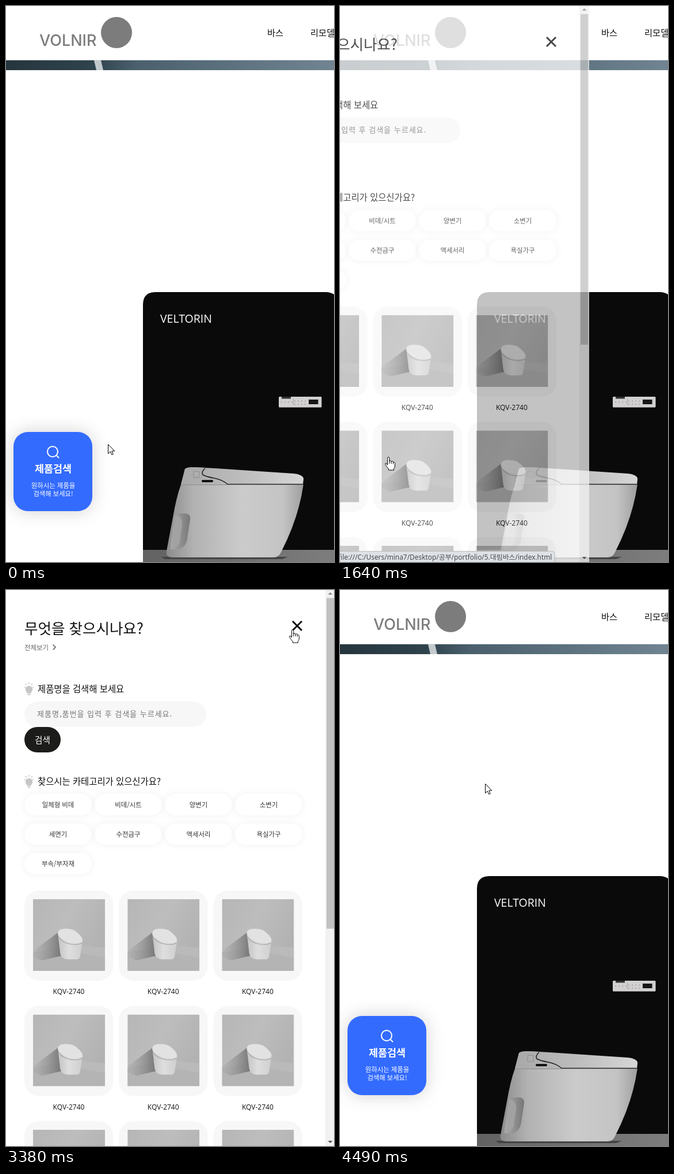
Animation, 570 px wide and 962 px high, one loop 5.02 s. Source, as an HTML page:

```html
<!DOCTYPE html>
<html lang="ko">
<head>
<meta charset="utf-8">
<title>제품검색</title>
<style>
html, body { margin: 0; width: 100%; height: 100%; overflow: hidden; background: #fff; }
svg { display: block; width: 570px; height: 962px; }
text { font-family: "Noto Sans CJK KR", "Noto Sans CJK", sans-serif; fill: #111; white-space: pre; }
.latin { font-family: "Open Sans", "Noto Sans", sans-serif; }
.mid { font-weight: 500; }
.anim { animation: 5020ms linear infinite both; }

#panel { animation-name: panel; }
@keyframes panel {
  0%, 27.31% { transform: translateX(-572px); opacity: 0; animation-timing-function: ease; }
  39.06%, 68.88% { transform: none; opacity: 1; animation-timing-function: ease; }
  80.64%, 100% { transform: translateX(-572px); opacity: 0; }
}
#search { animation-name: search; }
@keyframes search {
  0%, 17.93% { opacity: 1; animation-timing-function: ease-in-out; }
  26.7%, 81.1% { opacity: 0; animation-timing-function: ease-in-out; }
  89.2%, 100% { opacity: 1; }
}
#status { animation-name: status; }
@keyframes status {
  0%, 13.1% { opacity: 0; }
  15.5%, 27.9% { opacity: 1; }
  30.08% { opacity: .25; }
  32%, 49.8% { opacity: 1; }
  53.4%, 100% { opacity: 0; }
}
#drop { animation-name: drop; transform-origin: 0 94px; }
@keyframes drop {
  0%, 69.9% { transform: scaleY(0); }
  70.7% { transform: scaleY(.5); }
  72.3% { transform: scaleY(1); }
  75%, 100% { transform: scaleY(0); }
}
#bath { animation-name: bath; }
@keyframes bath {
  0%, 68.7% { fill: #111; }
  69.7%, 71.7% { fill: #337ab7; }
  72.5%, 100% { fill: #111; }
}
#cursor { animation-name: travel; }
@keyframes travel {
  0%, 5.38% { transform: translate(177px, 758px); animation-timing-function: ease-in-out; }
  10.36%, 45.22% { transform: translate(84px, 780px); }
  52.19% { transform: translate(480px, 87px); }
  55.18% { transform: translate(494px, 70px); }
  57.97%, 62.55% { transform: translate(495px, 70px); }
  63.35%, 67.33% { transform: translate(498px, 68px); }
  70.72% { transform: translate(471px, 97px); }
  77.7% { transform: translate(294px, 296px); }
  81.1%, 100% { transform: translate(252px, 335px); }
}
#arrow, #hand { animation-timing-function: step-end; }
#arrow { animation-name: arrow; }
#hand { animation-name: hand; }
@keyframes arrow { 0% { opacity: 1; } 7% { opacity: 0; } 47.8% { opacity: 1; } 62.7% { opacity: 0; } 68.5%, 100% { opacity: 1; } }
@keyframes hand { 0% { opacity: 0; } 7% { opacity: 1; } 47.8% { opacity: 0; } 62.7% { opacity: 1; } 68.5%, 100% { opacity: 0; } }

.pill { fill: #fff; filter: drop-shadow(0 0 6px rgba(0, 0, 0, .06)); }
.blue { fill: #336bff; filter: drop-shadow(0 0 15px rgba(0, 0, 0, .18)); }
</style>
</head>
<body>
<svg viewBox="0 0 570 962">
  <defs>
    <linearGradient id="band">
      <stop stop-color="#25353d"/><stop offset=".27" stop-color="#30444e"/>
      <stop offset=".4" stop-color="#4b606d"/><stop offset="1" stop-color="#708491"/>
    </linearGradient>
    <linearGradient id="bowl">
      <stop stop-color="#8b8b8b"/><stop offset=".2" stop-color="#b2b2b2"/>
      <stop offset=".55" stop-color="#cbcbcb"/><stop offset=".85" stop-color="#c4c4c4"/><stop offset="1" stop-color="#9e9e9e"/>
    </linearGradient>
    <linearGradient id="lid">
      <stop stop-color="#a8a8a8"/><stop offset=".5" stop-color="#bdbdbd"/><stop offset="1" stop-color="#d6d6d6"/>
    </linearGradient>
    <linearGradient id="hollow">
      <stop stop-color="#aaa"/><stop offset="1" stop-color="#777"/>
    </linearGradient>
    <linearGradient id="ground">
      <stop stop-color="#626262"/><stop offset="1" stop-color="#7d7d7d"/>
    </linearGradient>
    <linearGradient id="wall" x2="1" y2=".5">
      <stop stop-color="#b6b6b6"/><stop offset=".5" stop-color="#bdbdbd"/><stop offset="1" stop-color="#b2b2b2"/>
    </linearGradient>
    <linearGradient id="shade">
      <stop stop-color="#999" stop-opacity=".15"/><stop offset="1" stop-color="#777"/>
    </linearGradient>
    <linearGradient id="pot">
      <stop stop-color="#c4c4c4"/><stop offset=".45" stop-color="#dedede"/><stop offset="1" stop-color="#cfcfcf"/>
    </linearGradient>
    <symbol id="photo" width="125" height="124" viewBox="0 0 125 124">
      <path fill="url(#wall)" d="M0 0H125V124H0Z"/>
      <path fill="#b4b4b4" d="M0 92L45 84L125 99V124H0Z"/>
      <path fill="#bababa" d="M82 80L125 84V101L80 93Z"/>
      <path fill="url(#shade)" d="M0 90L44 57L49 98L15 106L0 99Z"/>
      <path fill="url(#pot)" d="M43 58L47 92Q48 103 60 104H76Q81 104 82 98L86 72Z"/>
      <path fill="#b1b1b1" d="M43 59Q45 68 56 74Q72 81 85 75V77Q71 82 56 76Q44 71 43 59Z"/>
      <path fill="#e2e2e2" d="M43 58Q44 51 56 51Q66 51 72 54Q87 65 86 72Q84 77 72 76Q58 75 50 69Q43 64 43 58Z"/>
    </symbol>
    <g id="bulb">
      <circle cx="8" cy="12" r="6.2" fill="#c6c6c6"/>
      <path fill="#c6c6c6" d="M4.5 16h7v3h-7zM5.5 20h5v2h-5z"/>
      <path stroke="#c6c6c6" stroke-width="1.5" d="M8 0v3M2 2l2 2.5M14 2l-2 2.5M0 8l2 .6M16 8l-2 .6"/>
    </g>
  </defs>

  <rect width="570" height="962" fill="#fff"/>
  <g id="page">
    <rect y="94" width="570" height="17" fill="url(#band)"/>
    <path fill="#c3c9cd" d="M153 94H165L169 111H157Z"/>
    <rect id="drop" class="anim" y="94" width="570" height="6" fill="#fff"/>
    <path stroke="#dfe2e4" d="M0 93.5H570"/>
    <text x="58" y="69" textLength="" style="font:500 27px Inter,sans-serif;fill:#7c7c7c">VOLNIR</text>
    <circle cx="192" cy="46" r="27" fill="#7c7c7c"/>
    <text id="bath" class="mid anim" x="454" y="52" font-size="15.3">바스</text>
    <text class="mid" x="529" y="52" font-size="15.3">리모델링</text>

    <path fill="#0a0a0a" d="M238 962V517Q238 495 260 495H555Q577 495 577 517V962Z"/>
    <path fill="url(#ground)" d="M238 941H570V962H238Z"/>
    <text class="latin" x="268" y="548" font-size="19.5" style="fill:#fff">VELTORIN</text>
    <rect x="474" y="676" width="74.5" height="18.5" rx="1.5" fill="#d2d0d1"/>
    <path fill="#333" d="M479 676H495V679.5H479Z"/>
    <path fill="#161616" d="M526 681H542.5V689H526Z"/>
    <path stroke="#aaa" stroke-width="2" stroke-dasharray="2 4" d="M478 685.5H498M501 683.5H523M501 689H523"/>
    <path stroke="#999" stroke-width=".7" d="M499.500 679V691"/>

    <path fill="#444" d="M270 953H490L480 957H276Z"/>
    <path fill="url(#bowl)" d="M311 801Q314 798 325 798L347 799L385 827H517Q509 885 478 945Q474 954 465 954H289Q277 954 279 943L290 885Q296 850 304 828Z"/>
    <path fill="url(#lid)" d="M311 801Q314 798 328 798L365 800L500 809Q518 811 517 819L516 828H304Z"/>
    <path fill="none" stroke="#222" stroke-width="1.6" d="M346 800Q339 806 342 811Q346 814 362 817Q377 820 385 827.500H517"/>
    <path fill="none" stroke="#8c8c8c" d="M304 828.500H385M326 805H336V816H326Z"/>
    <rect x="340" y="820" width="20" height="4" rx="2" fill="#111"/>
    <path fill="url(#hollow)" d="M293 881Q295 878 302 878H312Q321 879 320 888L315 921Q313 936 300 940H287Q285 940 286 934Z"/>
    <path fill="#a2a2a2" d="M293 886Q294 881 300 883Q307 887 306 896L302 926Q300 937 288 938Z"/>
  </g>

  <g id="search" class="anim">
    <rect class="blue" x="13" y="737" width="137" height="137" rx="25"/>
    <path fill="none" stroke="#fff" stroke-width="2" stroke-linecap="round" d="M72 771a9 9 0 1 0 18 0a9 9 0 1 0 -18 0M87.500 777.500L91.500 781.500"/>
    <g text-anchor="middle" style="--ink:#fff">
      <text x="82" y="806.500" font-size="17.400" font-weight="700" style="fill:#fff">제품검색</text>
      <text class="mid" x="82" y="833.500" font-size="11.400" style="fill:#fff">원하시는 제품을</text>
      <text class="mid" x="82" y="847.500" font-size="11.300" style="fill:#fff">검색해 보세요!</text>
    </g>
  </g>

  <g id="panel" class="anim">
    <rect width="572" height="962" fill="#fff"/>
    <text x="32" y="75.500" font-size="25.500">무엇을 찾으시나요?</text>
    <text x="32" y="103.500" font-size="11.400" style="fill:#666">전체보기</text>
    <path fill="none" stroke="#666" stroke-width="1.600" d="M81.500 94.500L86 99L81.500 103.500"/>
    <path stroke="#0a0a0a" stroke-width="3" d="M498 54L514 70M514 54L498 70"/>
    <use href="#bulb" x="32" y="160"/>
    <text class="mid" x="55" y="176.500" font-size="15.400">제품명을 검색해 보세요</text>
    <rect x="32" y="193" width="316" height="44" rx="22" fill="#f7f7f7"/>
    <text x="54" y="219" font-size="13" letter-spacing="1" style="fill:#757575">제품명,품번을 입력 후 검색을 누르세요.</text>
    <rect x="32" y="237" width="63" height="44" rx="22" fill="#1c1c1b"/>
    <text class="mid" x="63.500" y="264.500" font-size="14.600" text-anchor="middle" style="fill:#fff">검색</text>
    <use href="#bulb" x="32" y="320"/>
    <text class="mid" x="55" y="336.500" font-size="15.400">찾으시는 카테고리가 있으신가요?</text>
    <g id="pills" text-anchor="middle"></g>
    <g id="cards" text-anchor="middle"></g>
    <rect x="555" width="17" height="962" fill="#f1f1f1"/>
    <rect x="557" y="14" width="13" height="572" fill="#c1c1c1"/>
    <path fill="#8a8a8a" d="M559.500 8L563.500 4L567.500 8Z"/>
    <path fill="#505050" d="M559.500 953L563.500 957L567.500 953Z"/>
  </g>

  <g id="status" class="anim">
    <path fill="#dee1e6" stroke="#b9bcc1" d="M-1 943.500H369Q372.500 943.500 372.500 947V963H-1Z"/>
    <text x="-3" y="957.500" font-size="11.900" style="font-family:'Noto Sans','Noto Sans CJK KR',sans-serif;fill:#484b4f">file:///C:/Users/mina7/Desktop/공부/portfolio/5.대림바스/index.html</text>
  </g>

  <g id="cursor" class="anim" fill="#fff" stroke="#000" stroke-linejoin="round">
    <path id="arrow" class="anim" d="M.5 .5V16.500L4.300 13L6.800 18.500L9.200 17.400L6.800 12H11.800Z"/>
    <g id="hand" class="anim">
      <path d="M-1.500 14V2.500Q-1.500 .5 0 .5Q1.800 .5 1.800 2.500V8Q2 6.700 3.400 6.700Q5 6.700 5.200 8.500Q5.600 7.500 6.800 7.600Q8.300 7.800 8.500 9.500Q9.200 8.800 10.200 9.200Q11.500 9.700 11.500 11.500V16Q11.500 18 9.500 20.500V23H.5V21Q-2.500 18 -5 13.500Q-6 11.500 -4.500 11Q-3.300 10.800 -1.500 14Z"/>
      <path fill="none" d="M1.800 8V12M5.200 8.500V12M8.500 9.500V12.500"/>
    </g>
  </g>
</svg>
<script>
const categories = ["일체형 비데", "비데/시트", "양변기", "소변기", "세면기", "수전금구", "액세서리", "욕실가구", "부속/부자재"];

const pill = (name, i) => {
  const x = 32 + (i % 4) * 122, y = 353 + Math.floor(i / 4) * 51;
  return `<rect class="pill" x="${x}" y="${y}" width="117" height="37" rx="18.5"/>
    <text class="mid" x="${x + 58.5}" y="${y + 22.5}" font-size="11.4" style="fill:#333">${name}</text>`;
};

const card = (_, i) => {
  const x = 32 + (i % 3) * 164.2, y = 520 + Math.floor(i / 3) * 199.5;
  return `<rect x="${x}" y="${y}" width="154.5" height="156" rx="25" fill="#f7f7f7"/>
    <use href="#photo" x="${x + 15}" y="${y + 15}"/>
    <text class="latin" x="${x + 77}" y="${y + 179}" font-size="12">KQV-2740</text>`;
};

document.getElementById("pills").innerHTML = categories.map(pill).join("");
document.getElementById("cards").innerHTML = Array.from({ length: 9 }, card).join("");
</script>
</body>
</html>
```
